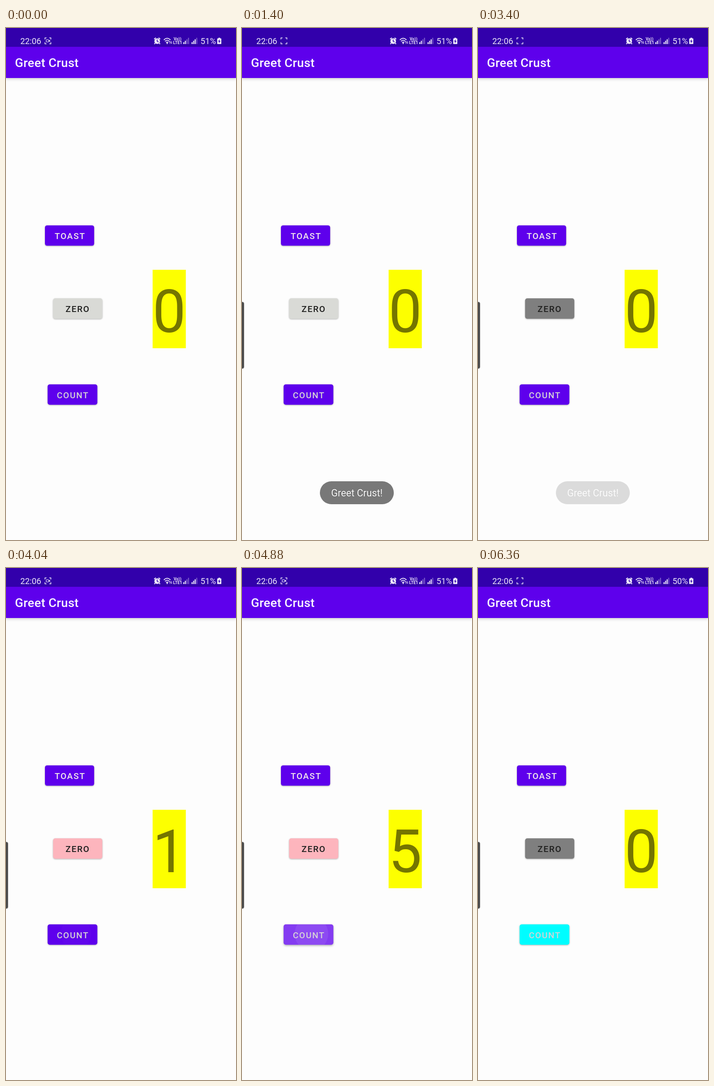
These frames come from a looping animation (502 px wide and 1116 px high, 6400 ms). An HTML page:

```html
<!DOCTYPE html>
<html lang="en">
<head>
<meta charset="utf-8">
<title>Greet Crust</title>
<style>
  html, body { margin: 0; width: 100%; height: 100%; overflow: hidden; background: #fdfdfd; }
  svg { display: block; width: 502px; height: 1116px; font-family: Roboto, sans-serif; }
  .label { font-size: 18.7px; font-weight: 500; letter-spacing: .0893em; }
  .status { fill: #eee8fa; }
  .line { fill: none; stroke: #eee8fa; stroke-width: 1.4; }
  #bar { filter: drop-shadow(0 2px 3px rgba(0, 0, 0, .2)); }
  #message { text-shadow: 0 0 2px rgba(0, 0, 0, .45); }
</style>
</head>
<body>
<svg viewBox="0 0 502 1116">
  <rect width="502" height="1116" fill="#fdfdfd"/>
  <rect id="bar" y="30" width="502" height="79" fill="#5e00ec"/>
  <rect width="502" height="41" fill="#3200ab"/>

  <g class="status">
    <text x="31.3" y="35" font-size="18.3">22:06</text>
    <path class="line" d="M85 25V21.5H88.5M94.500 21.5H98V25M98 31V34.500H94.500M88.500 34.500H85V31"/>
    <g id="camera">
      <rect class="line" x="87.700" y="25.500" width="5.300" height="5" rx="1" style="stroke-width:1.200"/>
      <path d="M93 28L96.200 25.300V30.700Z"/>
    </g>
    <circle cx="330" cy="28.600" r="6.200"/>
    <path class="line" style="stroke-width:2" d="M323.300 24.300L327 21.300M333 21.300L336.700 24.300M325.500 33L323.800 35M334.500 33L336.200 35"/>
    <path d="M330 25V29L333 30.700" fill="none" stroke="#3200ab" stroke-width="1.500"/>
    <path class="line" style="stroke-width:1.800" d="M344.500 26Q351.800 18.800 359 26M347 29Q351.800 24.300 356.500 29M349.400 31.800Q351.800 29.600 354.200 31.800"/>
    <circle cx="351.800" cy="33.700" r="1.400"/>
    <path d="M356.300 31L358 28.500L359.700 31ZM357.500 30.500H358.500V34.500H357.500ZM359.500 32L361.200 34.500L362.900 32ZM360.700 28.500H361.700V32.500H360.700Z"/>
    <text x="366" y="26.700" font-size="8.800" font-weight="700">Vo))</text>
    <text x="364.700" y="35" font-size="9" font-weight="700">LTE1</text>
    <g id="bars"></g>
    <text id="charge" x="424.500" y="35" font-size="18.300">51%</text>
    <path d="M463.500 21.300H467.500V22.800H469Q470 22.800 470 23.800V34Q470 35 469 35H462Q461 35 461 34V23.800Q461 22.800 462 22.800H463.500Z"/>
    <path d="M466.500 24.500L462.800 29.600H465.200L464.300 33.600L468.400 28.300H465.900Z" fill="#3200ab"/>
  </g>
  <text x="19.400" y="85" font-size="26.700" font-weight="500" letter-spacing=".33" fill="#fbf8ff">Greet Crust</text>

  <g id="buttons"></g>

  <rect x="320" y="527" width="72.500" height="171" fill="#fdff00"/>
  <text id="digit" x="320" y="663" font-size="129" fill="#747500">0</text>

  <rect id="handle" x="-8" y="597" width="12.500" height="145.500" rx="4" fill="#484848" stroke="#a8a8a8" stroke-width=".8"/>

  <g id="toast">
    <rect x="170" y="988" width="161.300" height="50" rx="25" fill="#6a6a6a"/>
    <text id="message" x="250.700" y="1021" text-anchor="middle" font-size="21.300" fill="#fafafa">Greet Crust!</text>
  </g>
</svg>
<script>
const LOOP = 6400;
const PURPLE = '#5e00ec', CYAN = '#00fdff', PINK = '#fdb5bd', GRAY = '#7f7f7f', LIGHT = '#d9dad6';
const $ = id => document.getElementById(id);
const clamp = v => Math.max(0, Math.min(1, v));
const ramp = (t, start, length) => clamp((t - start) / length);
const easeOut = p => 1 - (1 - p) ** 2;

function add(parent, tag, attrs, text = '') {
  const node = document.createElementNS('http://www.w3.org/2000/svg', tag);
  set(node, attrs);
  node.textContent = text;
  return parent.appendChild(node);
}
function set(node, attrs) {
  for (const key in attrs) node.setAttribute(key, attrs[key]);
}

// A press starts at `down`, clicks at `up`, and its ripple fades from `fade`.
const tap = (down, x, y) => ({ down, up: down + 95, fade: down + 225, x, y });
const countTaps = [tap(3465, 148, 799)];
for (let i = 0; i < 7; i++) countTaps.push(tap(4035 + 206 * i, 153, 797));
const zeroTaps = [
  { down: 2320, up: 2580, fade: 2600, x: 160, y: 612 },
  { down: 6115, up: 6190, fade: 6200, x: 160, y: 612 }
];
const toastTaps = [{ down: 813, up: 1000, fade: 1038, x: 95, y: 455 }];

function makeButton(name, x, y, width, textX, color, ink, taps) {
  const shape = { x, y, width, height: 44.4, rx: 4.8 };
  const group = add($('buttons'), 'g', {});
  const face = add(group, 'rect', { ...shape, fill: color });
  const clip = add(group, 'clipPath', { id: 'clip' + name });
  add(clip, 'rect', shape);
  const layer = add(group, 'g', { 'clip-path': `url(#clip${name})`, fill: '#fff' });
  const ripples = taps.map(() => add(layer, 'circle', {}));
  add(group, 'text', { class: 'label', x: textX, y: y + 29.8, fill: ink }, name);
  const cx = x + width / 2, cy = y + 22.2;

  return (t, fill) => {
    let lift = 0;
    taps.forEach((p, i) => {
      const grow = easeOut(ramp(t, p.down, 225));
      const alpha = Math.min(ramp(t, p.down, 75), 1 - ramp(t, p.fade, 150));
      set(ripples[i], {
        cx: p.x + (cx - p.x) * grow,
        cy: p.y + (cy - p.y) * grow,
        r: 32 + 26 * grow,
        opacity: .24 * alpha
      });
      lift = Math.max(lift, Math.min(ramp(t, p.down, 100), 1 - ramp(t, p.up + 60, 100)));
    });
    face.setAttribute('fill', fill);
    face.style.filter = `drop-shadow(0 ${1.5 + 4 * lift}px ${1.5 + 3 * lift}px rgba(0,0,0,.3))`;
  };
}

const drawToast = makeButton('TOAST', 85, 430.2, 107.4, 106.2, PURPLE, '#f3e9ea', toastTaps);
const drawZero = makeButton('ZERO', 102.8, 589.3, 107.4, 130, LIGHT, '#20201f', zeroTaps);
const drawCount = makeButton('COUNT', 90.8, 776.8, 108.6, 111, PURPLE, '#d6d3d6', countTaps);

for (const left of [387, 405]) {
  for (let i = 0; i < 4; i++) {
    const height = 4 + 3.2 * i;
    add($('bars'), 'rect', {
      x: left + 3.4 * i, y: 35 - height, width: 2.2, height, opacity: i < 2 || (left > 400 && i < 3) ? 1 : .4
    });
  }
}

function render(t) {
  const clicks = countTaps.filter(p => t >= p.up).length;
  const reset = t >= zeroTaps[1].up;
  drawToast(t, PURPLE);
  drawZero(t, reset ? GRAY : clicks ? PINK : t >= zeroTaps[0].up ? GRAY : LIGHT);
  drawCount(t, clicks && clicks % 2 === 0 ? CYAN : PURPLE);
  $('digit').textContent = reset ? 0 : clicks;
  $('charge').textContent = t < 6300 ? '51%' : '50%';

  const phase = t % 1000, hideAt = t < 1000 ? 240 : 280;
  $('camera').setAttribute('visibility', phase >= hideAt && phase < 760 ? 'hidden' : 'visible');
  $('handle').setAttribute('transform', `translate(${-6 * (1 - easeOut(ramp(t, 20, 220)))} 0)`);
  $('toast').setAttribute('opacity', easeOut(ramp(t, 1060, 500)) * (1 - ramp(t, 2960, 500) ** 2));
}

const start = performance.now();
function frame(now) {
  render(Math.max(0, now - start) % LOOP);
  requestAnimationFrame(frame);
}
render(0);
requestAnimationFrame(frame);
</script>
</body>
</html>
```
